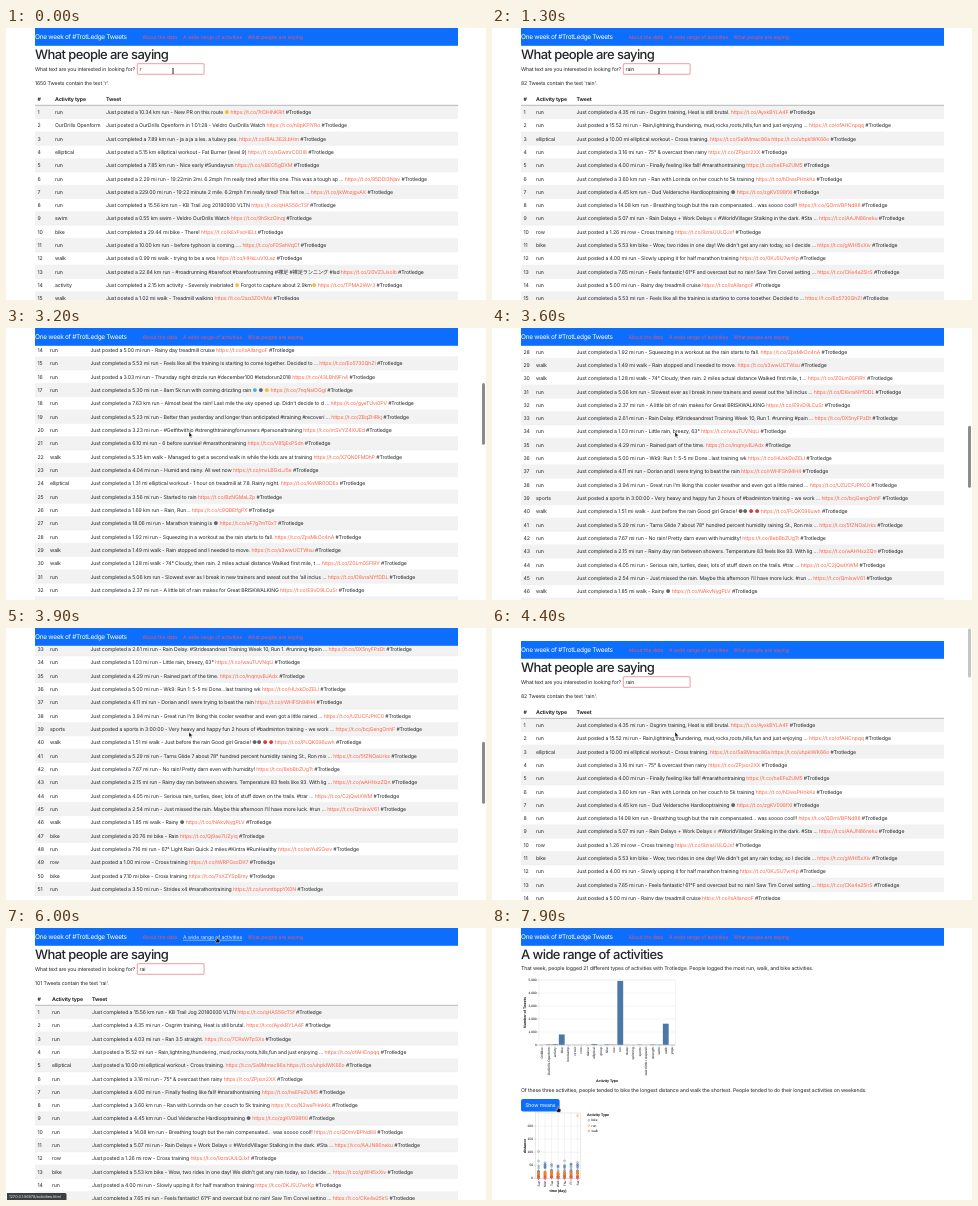
An HTML page for the animation above (8 s loop, 480x272 px).

```html
<!DOCTYPE html>
<html lang="en">
<head>
<meta charset="utf-8">
<title>One week of tweets</title>
<style>
html, body { margin: 0; width: 100%; height: 100%; overflow: hidden; background: #fff; }
svg { display: block; width: 100vw; height: 100vh; }
text { font: 5.2px Inter, "Noto Sans CJK JP", "Noto Sans", sans-serif; letter-spacing: -.022em; fill: #212529; text-rendering: geometricPrecision; }
.h1 { font-size: 13px; font-weight: 500; letter-spacing: -.045em; }
.brand { font-size: 6.5px; letter-spacing: -.045em; fill: #fff; }
.b { font-weight: 700; }
.link { fill: #fb6549; }
.nav { fill: #e2576a; }
.nav.on { fill: #d5e3ff; text-decoration: underline; }
.lab { font: 3.25px "Liberation Sans", Arial, sans-serif; letter-spacing: 0; fill: #000; }
.ttl { font: bold 3.6px "Liberation Sans", Arial, sans-serif; letter-spacing: 0; fill: #000; }
.tip { font-size: 3.9px; fill: #e8eaed; }
</style>
</head>
<body>
<svg id="stage" viewBox="0 0 480 272" preserveAspectRatio="none"></svg>
<script>
const LOOP = 8000, PITCH = 13.32, BLUE = '#0d6efd', TAG = '#Trotledge';

// Each row: verb, activity, amount | remark | link code. A tilde and a letter make a coloured dot.
const lines = s => s.trim().split('\n');

const anyRows = lines(`
p run 10.34 km|New PR on this route ~y|7rOIHNKRif
p OurDrills_Openform in 1:01:28|Veldro OurDrills Watch|n8pKPlYRo
c run 7.89 km|ja a ja a les. a tulavy pes.|BAL3E2LbHm
p elliptical 5.15 km|Fat Burner (level 9)|sGwmrC0OI8
c run 7.85 km|Nice early #Sundayrun|sBEO5gDXM
p run 2.29 mi|19:22min 2mi. 6.2mph I'm really tired after this one. This was a tough sp ...|95DDI3Njav
p run 229.00 mi|19:22 minute 2 mile. 6.2mph I'm really tired! This felt re ...|jkWnzjgvAX
c run 15.56 km|KB Trail Jog 20180930 VLTN|qHAS56cTSf
p swim 0.55 km|Veldro OurDrills Watch|9hSkzOlnqj
c bike 29.44 mi|There!|kExFxoHELt
p run 10.00 km|before typhoon is coming.....|oF0SehVqCf
p walk 0.99 mi|trying to be a wos|HHkLuVXLez
p run 22.84 km|#roadrunning #barefoot #barefootrunning #裸足 #裸足ランニング #lsd|20VZ3JxoIb
c activity 2.15 km|Severely inebriated ~y Forgot to capture about 2.9km~y|TPMA2IAVr3
p walk 1.02 mi|Treadmill walking|2aq3ZOVMsi`);

const rainRows = lines(`
c run 4.35 mi|Osgrim training, Heat is still brutal.|AyxkBYLA4F
p run 15.52 mi|Rain,lightning,thundering, mud,rocks,roots,hills,fun and just enjoying ...|ofAHCnpqq
p elliptical 10.00 mi|Cross training.|Sa9Mmac86a https://t.co/uhpkIWK66o
c run 3.16 mi|75° & overcast then rainy|ZPjsor2XX
c run 4.00 mi|Finally feeling like fall! #marathontraining|heEFeZUM5
c run 3.60 km|Ran with Lorinda on her couch to 5k training|N3wsPHnkKs
c run 4.45 km|Oud Veldersche Hardlooptraining ~k|zgKV098fXl
c run 14.08 km|Breathing tough but the rain compensated... was soooo cool!!|QOmVBPNd88
c run 5.07 mi|Rain Delays + Work Delays = #WorldVillager Stalking in the dark. #Sta ...|AAJN86neku
p row 1.26 mi|Cross training|9zraUULQJxf
c bike 5.53 km|Wow, two rides in one day! We didn't get any rain today, so I decide ...|gWHl5xXiv
p run 4.00 mi|Slowly upping it for half marathon training|0KJSU7wrKp
c run 7.65 mi|Feels fantastic! 61°F and overcast but no rain! Saw Tim Corvel setting ...|CKe4e25lrS
p run 5.00 mi|Rainy day treadmill cruise|lxAllangoF
c run 5.53 mi|Feels like all the training is starting to come together. Decided to ...|Eo5730QhZl
p run 3.03 mi|Thursday night drizzle run #december100 #letsdorun2018|43LBhl9Fn4
c run 5.30 mi|8am 5k run with coming drizzling rain ~b ~k ~y|7nqNsIOGgl
c run 7.63 km|Almost beat the rain! Last mile the sky opened up. Didn't decide to d ...|gyeTUvi0PV
c run 5.23 mi|Better than yesterday and longer than anticipated #training #recoveri ...|ZBqZHRkj
c run 3.23 mi|#Getfitwithjo #strengthtrainingforrunners #personaltraining|mSVYZ4XUEd
c run 6.10 mi|6 before sunrise! #marathontraining|V85jExPSdn
c walk 5.35 km|Managed to get a second walk in while the kids are at training|X7QN0FMDhP
c run 4.04 mi|Humid and rainy. All wet now|mvLBGxLJ5e
c elliptical 1.31 mi|1 hour on treadmill at 7.8. Rainy night.|KnMR0ODEs
c run 3.56 mi|Started to rain|BzNGMaLZp
c run 1.69 km|Rain, Run...|c9QBElfgPX
c run 18.06 mi|Marathon training is ~k|eF7g7mT0xT
c run 1.92 mi|Squeezing in a workout as the rain starts to fall.|ZpsMkOc4nA
c walk 1.49 mi|Rain stopped and I needed to move.|s3wwUCTWsu
c walk 1.28 mi|74° Cloudy, then rain. 2 miles actual distance Walked first mile, t ...|Z0Lm0SFIRY
c run 5.06 km|Slowest ever as I break in new trainers and sweat out the 'all inclus ...|D8vraNYfDDL
c run 2.37 mi|A little bit of rain makes for Great BRISKWALKING|E9vD9LCuSr
c run 2.61 mi|Rain Delay. #Stridesandrest Training Week 10, Run 1. #running #pain ...|0X5nyFPzDt
c run 1.03 mi|Little rain, breezy, 63°|wauTUVNqLi
c run 4.29 mi|Rained part of the time.|lnqmjvBJAdx
c run 5.00 mi|Wk9: Run 1: 5-5 mi Done...last training wk|HUxkDoZELl
c run 4.11 mi|Dorian and I were trying to beat the rain|rWHFSh94H4
c run 3.94 mi|Great run I'm liking this cooler weather and even got a little rained ...|UZUCFJPKC0
p sports in 3:00:00|Very heavy and happy fun 2 hours of #badminton training - we work ...|bcjGengOnhF
c walk 1.51 mi|Just before the rain Good girl Gracie! ~k~k ~r ~r|PLQK096uwh
c run 5.29 mi|Tarns Glide 7 about 78° hundred percent humidity raining St., Ron mix ...|5fZNOaUrks
c run 7.67 mi|No rain! Pretty darn even with humidity!|8ebBbZUgTt
c run 2.15 mi|Rainy day ran between showers. Temperature 83 feels like 93. With lig ...|wAHHxzZQn
c run 4.05 mi|Serious rain, turtles, deer, lots of stuff down on the trails. #trar ...|C2jQwIXWM
c run 2.54 mi|Just missed the rain. Maybe this afternoon I'll have more luck. #run ...|QmlswV61
c walk 1.85 mi|Rainy ~k|NAkvNygPLV
c bike 20.76 mi|Rain|Qj9ae7UZyiq
c run 7.16 mi|67° Light Rain Quick 2 miles #Kintra #RunHealthy|anYuISGwv
p row 1.00 mi|Cross training|tWRPGsoDK7
p bike 7.10 mi|Cross training|7xXZYSpBmy
c run 3.50 mi|Strides x4 #marathontraining|ummtbppYX0N`);

const raiRows = [anyRows[7], rainRows[0], 'c run 4.03 mi|Ran 3.5 straight.|7CRsWTpSXs', ...rainRows.slice(1, 13)];

const pages = [
  { q: 'r', count: 1650, rows: anyRows, ax: 49, tx: 100 },
  { q: 'ra', count: 302, rows: raiRows, ax: 46, tx: 86 },
  { q: 'rai', count: 101, rows: raiRows, ax: 46, tx: 86 },
  { q: 'rain', count: 82, rows: rainRows, ax: 44, tx: 84.5 }
];

const text = (x, y, s, cls = '', more = '') => `<text x="${x}" y="${y}" class="${cls}" ${more}>${s}</text>`;
const rect = (x, y, w, h, fill, more = '') => `<rect x="${x}" y="${y}" width="${w}" height="${h}" fill="${fill}" ${more}/>`;
const line = (x1, y1, x2, y2, c, w = .33) => `<path d="M${x1} ${y1}L${x2} ${y2}" stroke="${c}" stroke-width="${w}"/>`;
const group = (id, s, more = '') => `<g id="${id}" ${more}>${s}</g>`;
const turned = (x, y, s, cls, anchor) => text(x, y, s, cls, `text-anchor="${anchor}" transform="rotate(-90 ${x} ${y})"`);

const dots = { y: '#f5bd35', r: '#e0393e', b: '#5aa9e6', k: '#666' };
const dotted = s => s.replace(/&/g, '&amp;').replace(/~([yrbk])/g, (m, k) => `<tspan fill="${dots[k]}">●</tspan>`);

function tweet(row) {
  const [head, note, code] = row.split('|');
  const [verb, kind, a, b] = head.split(' ');
  const act = kind.replace('_', ' ');
  const what = a === 'in' ? `${act} in ${b}` : `${a} ${b} ${act}${act === 'elliptical' ? ' workout' : ''}`;
  const start = `Just ${verb === 'c' ? 'completed' : 'posted'} a ${what} - `;
  return { act, body: `${start}${dotted(note)} <tspan class="link">https://t.co/${code}</tspan> ${TAG}` };
}

function table({ q, count, rows, ax, tx }) {
  let s = text(29, 56.9, `${count} Tweets contain the text '${q}'.`) + text(133.6, 42.9, q);
  s += text(31.5, 72.9, '#', 'b') + text(ax, 72.9, 'Activity type', 'b') + text(tx, 72.9, 'Tweet', 'b');
  rows.forEach((row, i) => {
    const top = 77.3 + i * PITCH, base = top + 8.6, t = tweet(row);
    if (i % 2 === 0) s += rect(29, top, 423, PITCH, '#f2f2f2');
    s += line(29, top + PITCH, 452, top + PITCH, '#dee2e6');
    s += text(31.5, base, i + 1) + text(ax, base, t.act) + text(tx, base, t.body);
  });
  return s + line(29, 77.3, 452, 77.3, '#777', .5);
}

function barChart() {
  const names = 'DrillBox,OurDrills Openform,activity,bike,bootcamp,circuit,core,dance,elliptical,group,hike,row,run,skate,spinning,sports,stairclimb / stepwell,strength,swim,walk,yoga'.split(',');
  const size = { activity: 60, bike: 810, elliptical: 75, hike: 45, row: 25, run: 4930, sports: 25, strength: 35, swim: 25, walk: 1640, 'OurDrills Openform': 40 };
  const left = 47, base = 117, step = 6.5, right = left + step * names.length;
  let s = '';
  for (let v = 0; v <= 5; v++) {
    const y = base - v * 13;
    s += line(left, y, right, y, '#ddd') + line(left - 1.6, y, left, y, '#888');
    s += text(left - 2.3, y + 1.1, v ? v + ',000' : '0', 'lab', 'text-anchor="end"');
  }
  names.forEach((n, i) => {
    const h = (size[n] || 6) * .013, x = left + i * step;
    s += rect(x + .33, base - h, 5.85, h, '#4c78a8') + line(x + 3.25, base, x + 3.25, base + 1.6, '#888');
    s += turned(x + 4.3, base + 2.3, n, 'lab', 'end');
  });
  s += `<rect x="${left}" y="52" width="${right - left}" height="65" fill="none" stroke="#ddd" stroke-width=".33"/>`;
  s += line(left, base, right, base, '#888');
  return s + text(115, 154, 'Activity Type', 'ttl', 'text-anchor="middle"') + turned(34, 84.5, 'Number of Tweets', 'ttl', 'middle');
}

function scatter() {
  let seed = 11;
  const rnd = () => (seed = seed * 16807 % 2147483647) / 2147483647;
  const left = 43.3, base = 250.3, k = .261, width = 45.5;
  const ring = (x, y, c) => `<circle cx="${x}" cy="${y}" r=".9" fill="none" stroke="${c}" stroke-width=".6" opacity=".75"/>`;
  const kinds = [['bike', '#4c78a8', 55, 14], ['run', '#f58518', 26, 16], ['walk', '#e45756', 9, 7]];
  let s = '';
  for (let v = 0; v <= 200; v += 50) {
    const y = base - v * k;
    s += line(left, y, left + width, y, '#ddd') + line(left - 1.6, y, left, y, '#888');
    s += text(left - 2.3, y + 1.1, v, 'lab', 'text-anchor="end"');
  }
  ['Sun', 'Mon', 'Tue', 'Wed', 'Thu', 'Fri', 'Sat'].forEach((d, i) => {
    const x = left + 3.25 + i * 6.5;
    s += line(x, 185, x, base, '#ddd') + line(x, base, x, base + 1.6, '#888') + turned(x + 1.1, base + 2.3, d, 'lab', 'end');
    for (const [, c, max, n] of kinds)
      for (let j = 0; j < n; j++) s += ring(x, base - max * rnd() * k, c);
  });
  for (const [day, v] of [[0, 103], [0, 66], [1, 60], [4, 67], [6, 61], [6, 240]])
    s += ring(left + 3.25 + day * 6.5, base - v * k, v > 200 ? '#f58518' : '#4c78a8');
  s += `<rect x="${left}" y="185" width="${width}" height="${base - 185}" fill="none" stroke="#bbb" stroke-width=".33"/>`;
  s += text(66, 263.8, 'time (day)', 'ttl', 'text-anchor="middle"') + turned(33.6, 218, 'distance', 'ttl', 'middle');
  s += text(95, 188.4, 'Activity Type', 'ttl');
  kinds.forEach(([n, c], i) => { s += ring(96.8, 192.3 + i * 5.4, c) + text(99.6, 193.4 + i * 5.4, n, 'lab'); });
  return s;
}

const finder = text(29, 31, 'What people are saying', 'h1')
  + text(29, 42.9, 'What text are you interested in looking for?')
  + rect(131.3, 35.7, 66.8, 10.6, '#fff', 'rx=".5" stroke="#e5747f" stroke-width=".7"')
  + pages.map((p, i) => group('list' + i, table(p))).join('')
  + group('caret', line(0, 38.4, 0, 44, '#222', .45));

const activities = text(29, 31, 'A wide range of activities', 'h1')
  + text(29, 42, 'That week, people logged 21 different types of activities with Trotledge. People logged the most run, walk, and bike activities.')
  + group('charts', barChart()
    + text(29, 163.9, 'Of these three activities, people tended to bike the longest distance and walk the shortest. People tended to do their longest activities on weekends.')
    + rect(29, 171, 38.6, 12.6, BLUE, 'rx="2"')
    + text(48.3, 179.1, 'Show means', '', 'text-anchor="middle" style="fill:#fff"')
    + scatter());

const navBar = rect(29, 0, 423, 17.8, BLUE)
  + text(29, 11.3, 'One week of #TrotLedge Tweets', 'brand')
  + text(136.5, 10.9, 'About the data', 'nav')
  + text(177, 10.9, 'A wide range of activities', 'nav', 'id="wide"')
  + text(241.5, 10.9, 'What people are saying', 'nav');

const stroke = 'stroke="#fff" stroke-width=".4"';
const cursor = group('beam', '<path d="M-1 -2.6Q0 -2.6 0 -2V2Q0 2.6 -1 2.6M1 -2.6Q0 -2.6 0 -2V2Q0 2.6 1 2.6" fill="none" stroke="#222" stroke-width=".55"/>')
  + group('arrow', `<path d="M0 0V5.2L1.2 4.1L2 5.9L2.8 5.5L2 3.8H3.6Z" fill="#111" ${stroke}/>`)
  + group('hand', `<path d="M-.6 0Q0 -.8 .6 0V2L2.8 2.6V4.2L2.2 5.8H-.8L-2 3.6L-1.6 2.8L-.6 3.6Z" fill="#111" ${stroke}/>`);

document.getElementById('stage').innerHTML = rect(0, 0, 480, 272, '#fff')
  + group('page', group('finder', finder) + group('acts', activities))
  + group('bar', navBar)
  + rect(476, 0, 3, 63, '#7f7f7f', 'id="thumb" rx="1.5"')
  + group('status', '<path d="M1 272V265H59Q60.5 265 60.5 266.5V272Z" fill="#3c4043"/>' + text(3, 269.8, '127.0.0.1:56978/activities.html', 'tip'))
  + group('mouse', cursor);

const $ = id => document.getElementById(id);
const show = (id, on) => { $(id).style.display = on ? '' : 'none'; };
const move = (id, x, y) => $(id).setAttribute('transform', `translate(${x} ${y})`);

// Keys are [time, ...values]; linear between neighbours.
function track(keys, t) {
  let i = 0;
  while (i < keys.length - 1 && keys[i + 1][0] <= t) i++;
  const a = keys[i], b = keys[i + 1] || a;
  const f = b === a || t < a[0] ? 0 : (t - a[0]) / (b[0] - a[0]);
  return a.slice(1).map((v, j) => v + (b[j + 1] - v) * f);
}

const scrollKeys = [[0, 0], [2600, 0], [2700, 3], [2800, 28], [3200, 235], [3500, 385], [3700, 455], [3900, 489], [4000, 440], [4300, 55], [4400, -13], [4500, -7], [4600, -2], [4700, 0]];
const mouseKeys = [[0, 167, 43], [1500, 167, 43], [1700, 173, 66], [1900, 173, 66], [2400, 183, 104], [5000, 183, 104], [5400, 200, 38], [5700, 211, 9], [7300, 211, 9], [7500, 150, 80], [7700, 78, 168], [7800, 66, 178.5]];
const thumbKeys = [[0, 0], [2600, 0], [2700, .3], [2800, .9], [4300, .9], [4400, .45], [4900, .4], [5200, 0], [6600, 0], [6700, .5], [7000, .5], [7300, 0]];
const typing = [[0, 0], [300, 1], [700, 2], [1200, 3], [5200, 2]];

function draw(ms) {
  const t = Math.floor((ms + .5) / 100) * 100 % LOOP;
  const [scroll] = track(scrollKeys, t), [mx, my] = track(mouseKeys, t), [fade] = track(thumbKeys, t);
  const stage2 = t >= 6600, hover = t >= 5700 && t < 7400;
  const now = typing.filter(k => k[0] <= t).pop()[1];

  show('finder', !stage2);
  show('acts', stage2);
  show('charts', t >= 6800);
  pages.forEach((p, i) => show('list' + i, i === now));
  move('page', 0, -scroll);
  move('bar', 0, Math.max(0, -scroll));

  show('caret', t % 1000 >= 500);
  move('caret', 134 + [1.9, 4.8, 6, 9][now], 0);

  const thumb = $('thumb'), ratio = stage2 ? .9 : 272 / 1175;
  thumb.setAttribute('opacity', fade);
  thumb.setAttribute('y', Math.max(0, scroll) * ratio + .5);
  thumb.setAttribute('height', 272 * ratio - 1 + Math.min(0, scroll));

  show('status', hover);
  $('wide').classList.toggle('on', hover);
  move('mouse', mx, my);
  const kind = t < 1600 ? 'beam' : hover || t >= 7800 ? 'hand' : 'arrow';
  for (const k of ['beam', 'arrow', 'hand']) show(k, k === kind);
}

const begin = performance.now();
function tick() {
  draw(performance.now() - begin);
  requestAnimationFrame(tick);
}
draw(0);
requestAnimationFrame(tick);
</script>
</body>
</html>
```
